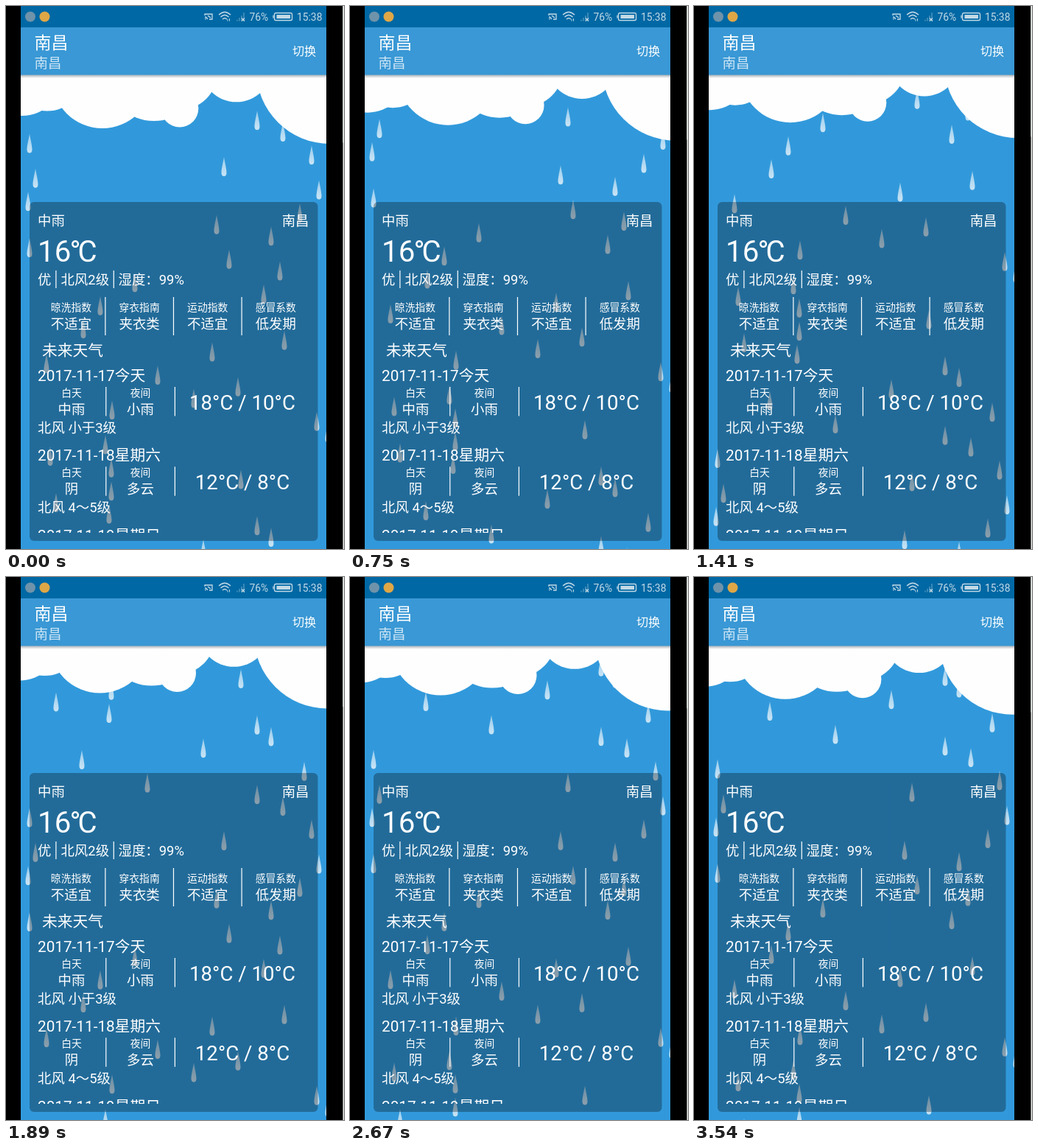
Write an HTML page that moves like this. It is 459 px wide and 737 px high and loops after 3.57 s.

```html
<!DOCTYPE html>
<html lang="zh-CN">
<head>
<meta charset="utf-8">
<title>天气</title>
<style>
  html, body { margin: 0; width: 100%; height: 100%; overflow: hidden; background: #000; }
  svg { display: block; }
  text { font-family: Roboto, "Noto Sans CJK SC", "Noto Sans CJK", sans-serif; fill: #fff; white-space: pre; }
</style>
</head>
<body>
<svg id="stage" width="459" height="737" viewBox="0 0 459 737">
  <defs>
    <linearGradient id="shade" x2="0" y2="1">
      <stop stop-color="#456" stop-opacity=".5"/>
      <stop offset="1" stop-color="#456" stop-opacity="0"/>
    </linearGradient>
    <linearGradient id="water" x2="0" y2="1">
      <stop stop-color="#fff" stop-opacity=".5"/>
      <stop offset="1" stop-color="#fff" stop-opacity=".74"/>
    </linearGradient>
    <path id="drop" fill="url(#water)" d="M0-13C1.2-6 3.5 3 3.5 8.5C3.5 11.5 2 13 0 13S-3.5 11.5-3.5 8.5C-3.5 3-1.2-6 0-13Z"/>
    <clipPath id="list"><rect x="32" y="480" width="392" height="235"/></clipPath>
  </defs>

  <rect x="20" width="415" height="737" fill="#3199db"/>
  <g id="rain"></g>
  <g id="cloud" fill="#fefefe"><rect y="40" width="459" height="68"/></g>

  <rect x="20" y="93" width="415" height="5" fill="url(#shade)"/>
  <rect x="20" y="29" width="415" height="64.5" fill="#3998d5"/>
  <rect x="20" width="415" height="29" fill="#0068a4"/>
  <rect x="32" y="266" width="391.5" height="460" rx="6" fill="#000" fill-opacity=".3"/>

  <circle cx="33" cy="14.5" r="7" fill="#6f93aa"/>
  <circle cx="52.5" cy="14.5" r="7" fill="#dfa746"/>
  <g fill="none" stroke="#c3d9e6" stroke-width="1.3">
    <path d="M270 13V11H280V18H276M270 15Q273 15 273.5 18M270 17.5H271.5M274 13L278 16"/>
    <path d="M289 12Q297 4.500 305 12M291.500 15Q297 9.500 302.500 15M294 18Q297 15 300 18"/>
    <path d="M301 18V20.500M303.500 17V20.500" stroke-width="1"/>
    <path d="M314 20.500V18.500M317 20.500V16M320 20.500V13M323 20.500V9" stroke-opacity=".45"/>
    <path d="M320 16.500L324 20.500M324 16.500L320 20.500"/>
    <rect x="364.500" y="9.500" width="24" height="10" rx="2"/>
    <path d="M363 12.500V16.500"/>
    <rect x="367.500" y="12" width="18.500" height="5" fill="#c3d9e6" stroke="none"/>
  </g>

  <g id="labels"></g>
  <g id="forecast" clip-path="url(#list)"></g>

  <rect width="20" height="737"/>
  <rect x="435" width="22.500" height="737"/>
  <rect x="457.500" width="1.500" height="737" fill="#e6eae6"/>
</svg>
<script>
const $ = id => document.getElementById(id);

function add(parent, tag, attrs, content) {
  const el = document.createElementNS('http://www.w3.org/2000/svg', tag);
  for (const k in attrs) el.setAttribute(k, attrs[k]);
  if (content) el.textContent = content;
  return parent.appendChild(el);
}

const TINY = 13.82, BODY = 18.43, HEAD = 20.74, BIG = 27.65;
let layer = $('labels');
const text = (str, x, y, size, more) => add(layer, 'text', { x, y, 'font-size': size, ...more }, str);
const mid = (str, x, y, size) => text(str, x, y, size, { 'text-anchor': 'middle' });
const rule = (x, y, h) => add(layer, 'rect', { x, y, width: 1.2, height: h, fill: '#fff' });

// Status bar and title
text('76%', 330.5, 20, TINY, { style: 'fill:#c3d9e6' });
text('15:38', 395, 20, TINY, { style: 'fill:#c3d9e6' });
text('南昌', 38.5, 57.5, 23);
text('南昌', 38.5, 83.5, BODY, { opacity: .75 });
text('切换', 389, 67, 16.13);

// Current weather
text('中雨', 43, 298, BODY);
text('南昌', 411.5, 298, BODY, { 'text-anchor': 'end' });
text('16℃', 43, 347, 40.3);
text('优', 43, 378, BODY);
text('北风2级', 74.5, 378, BODY);
text('湿度：99%', 152.5, 378, BODY);
rule(67.3, 359, 24);
rule(145.7, 359, 24);

[['晾洗指数', '不适宜'], ['穿衣指南', '夹衣类'], ['运动指数', '不适宜'], ['感冒系数', '低发期']]
  .forEach(([name, value], i) => {
    const x = 88.5 + i * 92.6;
    mid(name, x, 414, TINY);
    mid(value, x, 437.5, BODY);
    if (i) rule(x - 46.8, 395, 52);
  });
text('未来天气', 49, 475, HEAD);

// Daily forecast
layer = $('forecast');
[['2017-11-17今天', '中雨', '小雨', '18°C / 10°C', '北风 小于3级'],
 ['2017-11-18星期六', '阴', '多云', '12°C / 8°C', '北风 4～5级'],
 ['2017-11-19星期日', '', '', '', '']]
  .forEach(([date, day, night, temp, wind], i) => {
    const y = 509 + i * 108.3;
    text(date, 43, y, HEAD);
    if (!day) return;
    mid('白天', 89, y + 20.5, TINY);
    mid(day, 89, y + 44.5, BODY);
    mid('夜间', 182.5, y + 20.5, TINY);
    mid(night, 182.5, y + 44.5, BODY);
    rule(135.2, y + 8, 39.5);
    rule(228.8, y + 8, 39.5);
    mid(temp, 321, y + 38.5, BIG);
    text(wind, 43, y + 69.5, BODY);
  });

// Cloud puffs: cx, cy, r
[[22, 95, 54], [56, 92, 50.5], [131, 97.5, 68.5], [201, 92, 64],
 [236, 139, 25.5], [236, 90, 51], [313, 82, 48.3], [440, 87, 100]]
  .forEach(([cx, cy, r]) => add($('cloud'), 'circle', { cx, cy, r }));

// Drops sit at even heights, one column each
const columns = [103, 405, 192, 341, 376, 32, 415, 296, 40, 425, 30, 399, 286, 360,
  32, 303, 372, 175, 350, 128, 450, 105, 378, 280, 55, 206, 315, 255, 144, 422,
  437, 135, 60, 143, 319, 143, 68, 140, 341, 360, 268];
const drops = columns.map(() => add($('rain'), 'use', { href: '#drop' }));

const LOOP = 3570, STEP = 30, SPAN = 644.5, TOP = 106;
const fall = [[0, 0], [750, 577], [1410, 1072], [1890, 1429], [2130, 1613.5],
  [2160, 1613.5], [2280, 1706], [3060, 2283], [3540, 2652]];

function fallen(t) {
  const i = Math.max(1, fall.findIndex(p => p[0] >= t));
  const [t0, d0] = fall[i - 1], [t1, d1] = fall[i];
  return d0 + (d1 - d0) * (t - t0) / (t1 - t0);
}

const swing = (t, peak) => Math.cos((t - peak) / 4600 * 2 * Math.PI);

function draw(now) {
  let t = Math.floor(now % LOOP / STEP) * STEP;
  if (t === 2160) t = 2130; // one held step
  const d = fallen(t);
  drops.forEach((el, i) => {
    const y = TOP + (2 + i * SPAN / columns.length + d) % SPAN;
    el.setAttribute('transform', `translate(${columns[i]} ${y.toFixed(2)})`);
  });
  const dx = 5.3 * swing(t, 700) - 3.2, dy = -4.8 * swing(t, 1800) - 3.7;
  $('cloud').setAttribute('transform', `translate(${dx.toFixed(2)} ${dy.toFixed(2)})`);
}

const start = performance.now();
function tick() {
  draw(performance.now() - start);
  requestAnimationFrame(tick);
}
tick();
</script>
</body>
</html>
```
